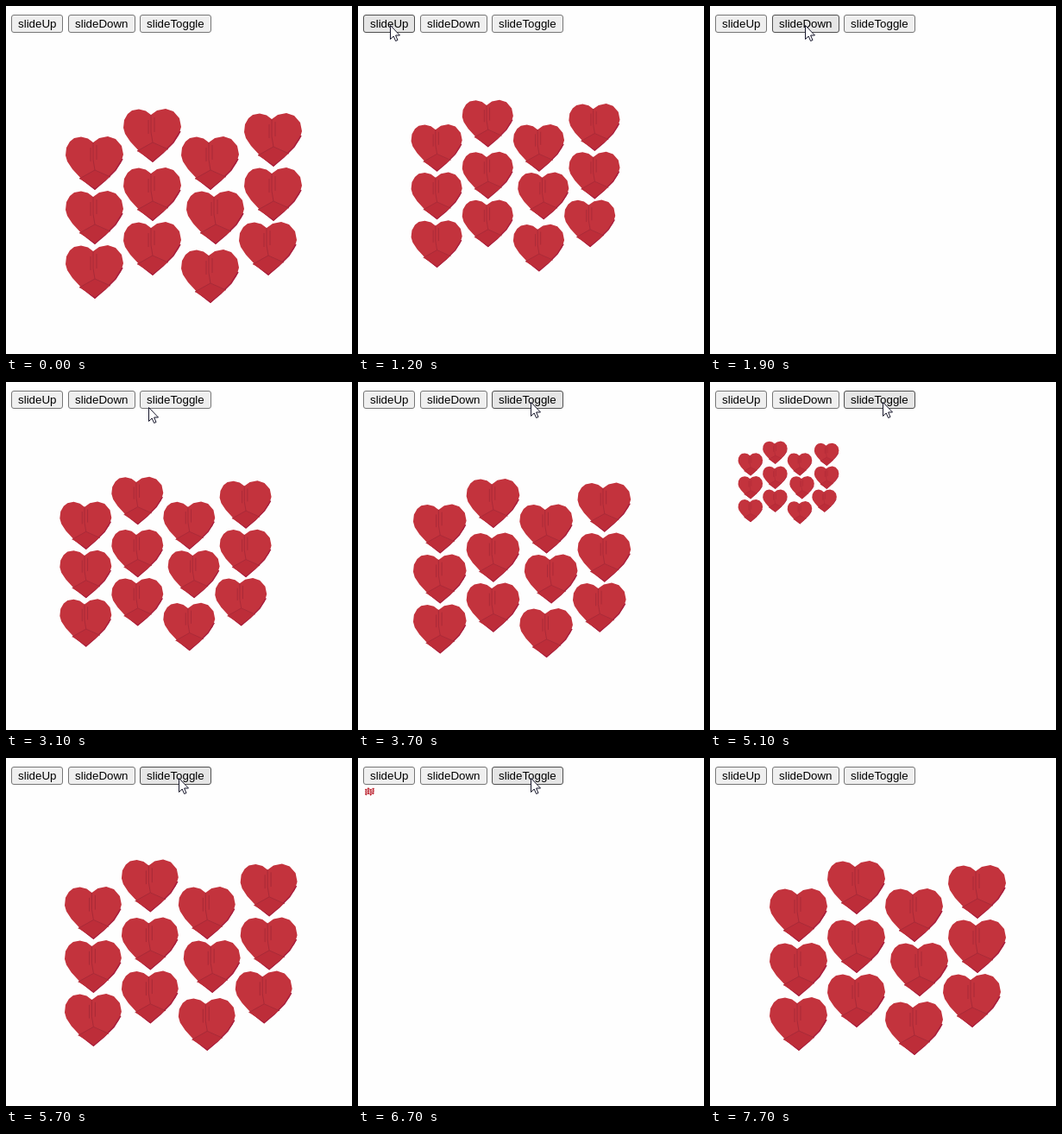
Animation, 401 px wide and 403 px high, one loop 8000 ms. Source, as an HTML page:

```html
<!DOCTYPE html>
<html lang="en">
<head>
<meta charset="utf-8">
<title>Slide buttons</title>
<style>
  html, body { margin: 0; width: 100%; height: 100%; overflow: hidden; background: #fefefe; }
  svg { display: block; }
  text { font: 13.333px Arial, "Liberation Sans", sans-serif; fill: #000; }
  .button rect { fill: #efefef; stroke: #767676; }
  .button.hover rect { fill: #e5e5e5; stroke: #4f4f4f; }
</style>
</head>
<body>
<svg width="401" height="403">
  <defs>
    <g id="heart">
      <path fill="#c3333d" d="M32 8L26 3.5 18 1.5 10 3 5 7 1 14 0 23 2 30 8 39 20 52 34 63 46 52 58 40 64 32 67 22 65 12 58 4 49 1 39 3Z"/>
      <path fill="none" stroke="#a91f3d" stroke-width="1.6" d="M66 27L58 40 46 52 34 62 20 51"/>
      <path fill="#bd2d39" d="M33 40L51 48 34 61 16 50Z"/>
      <path fill="none" stroke="#a82a38" d="M32 8V28L34 40 16 50M34 40L52 48M29 14V30M36 11V28"/>
    </g>
  </defs>
  <g id="picture"></g>
  <g id="buttons"></g>
  <path id="cursor" fill="#fff" stroke="#15152a" d="M.5.5V16.5L4.2 13 6.6 18.5 9 17.5 6.6 12H11.5Z"/>
</svg>
<script>
const LOOP = 8000, STEP = 100;
const get = id => document.getElementById(id);

const hearts = [[69, 150], [136, 118], [203, 150], [276, 123], [69, 213], [136, 186],
  [209, 213], [276, 186], [69, 276], [136, 249], [203, 281], [270, 249]];
get('picture').innerHTML = hearts.map(([x, y]) => `<use href="#heart" x="${x}" y="${y}"/>`).join('');

const labels = [['slideUp', 6, 60], ['slideDown', 72, 78], ['slideToggle', 155, 83]];
get('buttons').innerHTML = labels.map(([label, x, w]) =>
  `<g class="button"><rect x="${x + .5}" y="10.5" width="${w - 1}" height="20" rx="2.5"/>
  <text x="${x + 8}" y="25">${label}</text></g>`).join('');
const buttons = [...get('buttons').children];

// Each slide: start, duration, final size
const slides = [[1000, 900, 0], [2310, 1000, 1], [3518, 1000, 0],
  [4647, 1000, 1], [5619, 1000, 0], [6572, 1000, 1]];
// Pointer path: time, x, y
const path = [[200, 386, 24], [300, 257, 32], [400, 228, 36], [500, 205, 40], [600, 150, 41],
  [700, 90, 38], [800, 50, 28], [900, 37, 22], [1200, 37, 22], [1700, 110, 22], [2700, 110, 22],
  [3100, 165, 29], [3400, 200, 23], [7000, 200, 23], [7300, 257, 31], [7600, 367, 27]];

function sizeAt(t) {
  const slide = slides.findLast(([start]) => start <= t);
  if (!slide) return 1;
  const [start, duration, end] = slide;
  const p = Math.min(1, (t - start) / duration);
  const swing = .5 - Math.cos(Math.PI * p) / 2;
  return end ? swing : 1 - swing;
}

function pointerAt(t) {
  const i = path.findIndex(([time]) => time >= t);
  if (i < 0 || t < path[0][0]) return null;
  const [t1, x1, y1] = path[i], [t0, x0, y0] = path[Math.max(0, i - 1)];
  const p = t1 > t0 ? (t - t0) / (t1 - t0) : 1;
  return [Math.round(x0 + (x1 - x0) * p), Math.round(y0 + (y1 - y0) * p)];
}

function draw(now) {
  const t = Math.floor(now % LOOP / STEP) * STEP;
  const size = sizeAt(t), pointer = pointerAt(t);
  get('picture').setAttribute('transform',
    `translate(${5.5 * (1 - size)} ${31 * (1 - size)}) scale(${size})`);
  get('cursor').style.display = pointer ? '' : 'none';
  if (pointer) get('cursor').setAttribute('transform', `translate(${pointer})`);
  labels.forEach(([, x, w], i) => {
    const over = pointer && pointer[1] < 29 && pointer[0] >= x && pointer[0] < x + w;
    buttons[i].classList.toggle('hover', !!over);
  });
}

const begin = performance.now();
function tick() {
  draw(performance.now() - begin);
  requestAnimationFrame(tick);
}
tick();
</script>
</body>
</html>
```
